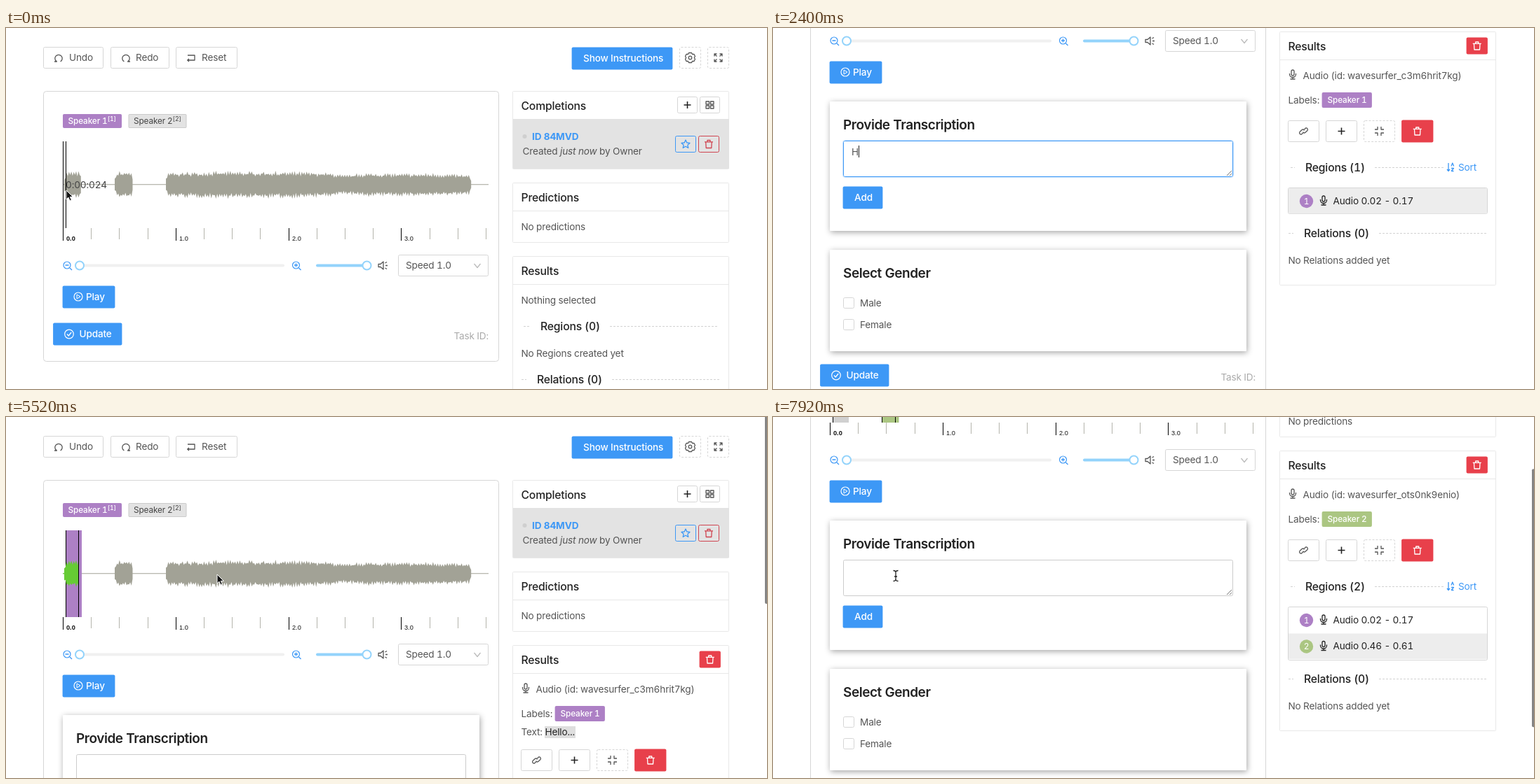
These frames come from a looping animation (1085 by 516 pixels, 8000 ms). An HTML page:

```html
<!DOCTYPE html>
<html lang="en">
<head>
<meta charset="utf-8">
<title>Audio labeling</title>
<style>
html, body { margin: 0; width: 100%; height: 100%; overflow: hidden; background: #fff; }
svg { display: block; width: 100%; height: 100%; }
text { font-family: Inter, "Open Sans", sans-serif; letter-spacing: -.011em; white-space: pre; font-variant-numeric: tabular-nums; }
.tick { font-family: "Liberation Sans", Arial, sans-serif; letter-spacing: 0; }
.card { filter: drop-shadow(1px 2px 4px rgba(0,0,0,.36)); }
</style>
</head>
<body>
<svg id="stage" viewBox="0 0 1085 516" preserveAspectRatio="none"></svg>
<script>
const LOOP = 8000, STEP = 120;
const BLUE = '#3d98f6', SKY = '#93d3fb', RED = '#e8404b', PURPLE = '#ad80c5', GREEN = '#abc682';
const DARK = '#222', BODY = '#555', EDGE = '#d6d6d6', PALE = '#e8e8e8';

// ---------- drawing helpers ----------
const box = (x, y, w, h, fill = '#fff', stroke, r = 2, more = '') => stroke
  ? `<rect x="${x + .5}" y="${y + .5}" width="${w - 1}" height="${h - 1}" rx="${r}" fill="${fill}" stroke="${stroke}" ${more}/>`
  : `<rect x="${x}" y="${y}" width="${w}" height="${h}" rx="${r}" fill="${fill}" ${more}/>`;
const solid = (x, y, w, h, fill) => box(x - .4, y - .4, w + .8, h + .8, fill);
const text = (x, cy, s, fill = BODY, size = 13.6, weight = 400, more = '') =>
  `<text x="${x}" y="${cy + size * .36}" fill="${fill}" font-size="${size}" font-weight="${weight}" ${more}>${s}</text>`;
const path = (x, y, d, stroke = BODY, w = 1.3, fill = 'none') =>
  `<path transform="translate(${x} ${y})" d="${d}" stroke="${stroke}" stroke-width="${w}" fill="${fill}" stroke-linejoin="round"/>`;
const circle = (x, y, r, fill, stroke = 'none', w = 1.2) =>
  `<circle cx="${x}" cy="${y}" r="${r}" fill="${fill}" stroke="${stroke}" stroke-width="${w}"/>`;
const vline = (x, y1, y2, c = '#000') => `<path d="M${x} ${y1}V${y2}" stroke="${c}"/>`;
const hline = (x1, x2, y, c = EDGE, dash = '') =>
  `<path d="M${x1} ${y + .5}H${x2}" stroke="${c}" stroke-dasharray="${dash}"/>`;
const dashes = (x1, x2, y) => hline(x1, x2, y, '#d2d2d2', '3 2');
const heading = (x, y, s) => text(x, y, s, DARK, 15.7, 500);

const CORNERS = [[-1, -1], [1, -1], [1, 1], [-1, 1]];
const icons = {
  undo: 'M-6 5H-2.6A5.2 5.2 0 1 1 2.6 5M-5 2.5L-2.6 5',
  redo: 'M6 5H2.6A5.2 5.2 0 1 0 -2.6 5M5 2.5L2.6 5',
  reset: 'M-5-4H5V3H-5M-3 1L-5.3 3L-3 5',
  gear: 'M-2-7H2L3-5L5.5-5L7-2L5.8 0L7 2L5.5 5H3L2 7H-2L-3 5H-5.5L-7 2L-5.8 0L-7-2L-5.5-5H-3Z',
  expand: CORNERS.map(([a, b]) => `M${a * 5.5} ${b * 2}V${b * 5.5}H${a * 2}M${a * 5.5} ${b * 5.5}L${a * 2} ${b * 2}`).join(''),
  shrink: CORNERS.map(([a, b]) => `M${a * 6.5} ${b * 2.5}H${a * 2.5}V${b * 6.5}`).join(''),
  grid: 'M-5.5-5H-1V-1H-5.5ZM1-5H5.5V-1H1ZM-5.5 1H-1V5H-5.5ZM1 1H5.5V5H1Z',
  plus: 'M-5 0H5M0-5V5',
  star: 'M0-6L1.8-2L6-1.6L2.8 1.2L3.8 5.4L0 3.2L-3.8 5.4L-2.8 1.2L-6-1.6L-1.8-2Z',
  trash: 'M-6-3.2H6M-2-3.2V-5.5H2V-3.2M-4.3-3.2L-3.8 5.5H3.8L4.3-3.2',
  link: 'M-1 2.5L-3 4.5A2.3 2.3 0 0 1 -5.5 1L-2-2.2A2.3 2.3 0 0 1 1-1M1-2.5L3-4.5A2.3 2.3 0 0 1 5.5-1L2 2.2A2.3 2.3 0 0 1 -1 1',
  mic: 'M-2-4A2 2 0 0 1 2-4V0A2 2 0 0 1 -2 0ZM-4.5-1V0A4.5 4.5 0 0 0 4.5 0V-1M0 4.5V7M-3.5 7H3.5',
  zoom: 'M4 4L7 7M-2.5 0H2.5',
  sound: 'M-6-2H-3L1-5.5V5.5L-3 2H-6ZM4 0H7M3.5-3.5L6-5M3.5 3.5L6 5',
  down: 'M-4.5-2.5L0 3L4.5-2.5',
  sort: 'M-3-6V5M-5 3L-3 5.5L-1 3M1 5.5H4.5M1 5.5L4.5 1.5H1M1-1.5L2.8-6L4.6-1.5',
  edit: 'M-6 6H6M-4 3L-3.4 .2L3-6L5-4L-1.4 2.4Z',
  tick: 'M-3 0L-.8 2.5L3.2-2.5',
  tri: 'M-2-3L3 0L-2 3Z'
};
const icon = (name, x, y, c, w = name === 'plus' ? 1.6 : 1.3) => path(x, y, icons[name], c, w);

function button(x, y, w, label, textX, c) {
  return (c ? solid(x, y, w, 31, c) : box(x, y, w, 31, '#fff', EDGE)) +
    text(textX, y + 15.5, label, c ? '#fff' : BODY, 13.6, c ? 500 : 400);
}
function iconButton(name, x, y, w, h, edge, c, more) {
  return box(x, y, w, h, 'none', edge, 2, more) + icon(name, x + w / 2, y + h / 2, c);
}
const redButton = (x, y, w, h) => solid(x, y, w, h, RED) + icon('trash', x + w / 2, y + h / 2, '#fff');
const DASHED = 'stroke-dasharray="3 2"';

// ---------- timing ----------
function track(keys, t) {
  const i = keys.findIndex(k => k[0] > t);
  if (i < 0) return keys[keys.length - 1].slice(1);
  if (!i) return keys[0].slice(1);
  const a = keys[i - 1], b = keys[i], p = (t - a[0]) / (b[0] - a[0]);
  return a.slice(1).map((v, j) => v + (b[j + 1] - v) * p);
}
const within = (t, a, b) => t >= a && t < b;

const SCROLL = [[840, 0], [1080, 188], [1440, 300], [1680, 321], [3600, 321], [3960, 460], [4200, 493],
  [5160, 493], [5520, 0], [5880, 0], [6000, -1], [6120, 0], [7320, 0], [7560, 160], [7800, 260], [7920, 278]];
const POINTER = [[0, 86, 232], [120, 86, 232], [600, 108, 236], [960, 103, 236], [1680, 103, 236], [2040, 175, 187],
  [3480, 175, 187], [3720, 172, 210], [4200, 126, 281], [5160, 126, 276], [5520, 301, 225], [5640, 301, 225],
  [6000, 142, 147], [6360, 216, 134], [6600, 216, 134], [6840, 155, 225], [7200, 179, 228], [7440, 179, 228], [7920, 175, 227]];

function stateAt(t) {
  const sel = within(t, 960, 5880) ? 1 : t >= 7320 ? 2 : 0;
  return {
    t, sel,
    count: t < 240 ? 0 : t < 6960 ? 1 : 2,
    hello: sel === 1 && t >= 3600,
    typed: within(t, 2400, 3600) ? 'Hello'.slice(0, 1 + Math.floor((t - 2400) / 180)) : '',
    focus: within(t, 2160, 3720),
    male: within(t, 4680, 5880),
    label: sel || (t < 720 ? 1 : t >= 6480 ? 2 : 0),
    scroll: track(SCROLL, t)[0],
    head: t < 960 ? 81.5 : t < 1800 ? 85.5 : t < 7320 ? 103.5 : 174.5
  };
}

// ---------- waveform ----------
const wave = (() => {
  let seed = 7;
  const rnd = () => (seed = seed * 16807 % 2147483647) / 2147483647;
  const burst = (x0, x1, amp) => {
    const up = [], low = [];
    for (let x = x0, i = 0; x <= x1; x += 1.7, i++) {
      const fade = Math.min(1, .5 + (x - x0) / 8, .2 + (x1 - x) / 4);
      const side = () => amp(x) * fade * (i % 2 ? .6 + rnd() * .2 : .78 + rnd() * .27);
      up.push(`${x.toFixed(1)} ${(223.7 - side()).toFixed(1)}`);
      low.unshift(`${x.toFixed(1)} ${(223.7 + side() * 1.04).toFixed(1)}`);
    }
    return `M${up.concat(low).join('L')}Z`;
  };
  const long = x => 17.5 + 1.5 * Math.sin((x - 228) / 75) - 3.5 * Math.exp(-(((x - 483) / 16) ** 2)) - Math.max(0, x - 610) / 18;
  return burst(83, 108.5, () => 18.5) + burst(155, 182, () => 18.5) + burst(228, 664, long) + 'M81 223.2H688V224.2H81Z';
})();

const region = (x0, x1, c) => box(x0, 162, x1 - x0, 124, c, '', 0) + vline(x0 + .5, 162, 286);

function waveform(s) {
  let out = `<path d="${wave}" fill="#a2a296"/>`;
  if (s.t >= 120) out += region(85, track([[0, 85], [120, 88], [600, 108]], s.t)[0], s.t < 5880 ? PURPLE : '#d0d0d0');
  if (s.count > 1) out += region(155, track([[6840, 155], [7200, 179.5]], s.t)[0], GREEN);
  if (s.head > 90) out += `<clipPath id="played"><rect x="81" y="160" width="${s.head - 81}" height="130"/></clipPath>` +
    `<path d="${wave}" fill="#66cb34" clip-path="url(#played)"/>`;
  out += vline(s.head, 162, 286);
  if (s.t < 120) out += vline(85.5, 162, 286) + text(85, 224, '0:00:024', '#444');
  for (let i = 0; i < 16; i++) {
    const x = Math.round(81 + i * 40.2) + .5, big = i % 4 === 0;
    out += vline(x, 286, big ? 304 : 302, big ? '#000' : '#b4b4ac');
    if (big) out += text(x + 4.5, 300.5, i / 4 + '.0', '#111', 9.2, i ? 400 : 700, 'class="tick"');
  }
  return out;
}

// ---------- left column ----------
function toolbar() {
  return button(53, 27, 86, 'Undo', 90) + icon('undo', 75, 43) +
    button(149, 27, 84, 'Redo', 185) + icon('redo', 171, 43) +
    button(242, 27, 88, 'Reset', 279) + icon('reset', 264, 43) +
    button(807, 28, 143, 'Show Instructions', 823, BLUE) +
    iconButton('gear', 960, 27, 31, 31, EDGE, BODY, DASHED) + circle(975.5, 42.5, 2.3, 'none', BODY) +
    iconButton('expand', 1000, 27, 31, 31, EDGE, BODY, DASHED);
}

function tag(x, w, n, on) {
  const c = on ? '#fff' : '#444';
  return box(x, 123, w, 20, on || '#e3e3e3', on || '#cbcbcb', 1) +
    text(x + 7.5, 133, `Speaker ${n}<tspan dy="-4" font-size="8.8">[${n}]</tspan>`, c, 11.8, on ? 500 : 400);
}

function controls() {
  const knob = x => circle(x, 339.5, 6, '#fff', SKY, 2);
  return circle(87, 339, 5, 'none', BLUE) + icon('zoom', 87, 339, BLUE) +
    box(105, 337.5, 292, 4, '#f0f0f0') + knob(105) +
    circle(413.5, 339, 5, 'none', BLUE) + icon('zoom', 413.5, 339, BLUE) + path(413.5, 339, 'M0-2.5V2.5', BLUE) +
    box(442, 337.5, 73, 4, SKY) + knob(514.5) + icon('sound', 537, 339.5) +
    box(559, 324, 129, 31, '#fff', EDGE) + text(570, 339.5, 'Speed 1.0') + icon('down', 672, 339.5, '#bbb') +
    button(81, 369, 74, 'Play', 114, BLUE) + circle(103, 384, 6, 'none', '#fff') + icon('tri', 103, 384, '#fff', 1);
}

function check(y, label, on, hover) {
  return box(100, y - 8, 16, 16, on ? BLUE : '#fff', on || hover ? BLUE : EDGE) +
    (on ? icon('tick', 108, y, '#fff', 2) : '') + text(124, y, label);
}

function cards(s, dy) {
  const title = (y, label) => text(100, y, label, DARK, 19, 600, 'style="letter-spacing:-.024em"');
  let out = box(81, 426, 594, 185 + dy, '#fff', '', 1, 'class="card"') + title(459, 'Provide Transcription') +
    box(100, 482, 556, 52, '#fff', s.focus ? BLUE : '#ccc', 2) + path(651, 529, 'M-4 3L3-4M0 3L3 0', '#777', 1);
  if (s.focus) {
    out += box(99, 481, 558, 54, 'none', '#cfe6fd', 3) + text(112, 498, s.typed) +
      vline(112.5 + [0, 10, 18, 21, 24, 33][s.typed.length], 489, 506, '#222');
  }
  out += button(100, 548, 56, 'Add', 116, BLUE);
  if (s.hello) out += box(100, 602, 83, 34, '#f2f2ef', '#c8c8c4', 4) + text(115, 619, 'Hello') +
    icon('edit', 161, 618.5, BLUE) + icon('trash', 202.5, 619.5, BLUE);
  return out + box(81, 638 + dy, 594, 145, '#fff', '', 1, 'class="card"') + title(671 + dy, 'Select Gender') +
    check(714 + dy, 'Male', s.male, within(s.t, 4200, 5280)) + check(745 + dy, 'Female');
}

function leftColumn(s) {
  const dy = s.hello ? 54 : 0, y = s.sel ? 802 + dy : 422;
  return box(53, 90, 650, y - 35, '#fff', EDGE, 4) +
    tag(81, 84, 1, s.label === 1 && PURPLE) + tag(174.5, 83, 2, s.label === 2 && GREEN) +
    waveform(s) + controls() + (s.sel ? cards(s, dy) : '') +
    button(67.5, y, 97.5, 'Update', 104.5, BLUE) + circle(90, y + 15.5, 6.3, 'none', '#fff') + icon('tick', 90, y + 15.5, '#fff') +
    text(688, y + 18, 'Task ID:', '#aaa', 13.6, 400, 'text-anchor="end"') +
    (s.sel ? text(542, y + 92, `Made by <tspan fill="${BLUE}">Brintav</tspan> in San Francisco`, BODY, 13.6, 400, 'text-anchor="middle"') +
      `<ellipse cx="542" cy="${y + 168}" rx="72" ry="39" fill="#8f8f88"/>` : '');
}

// ---------- right column ----------
const panel = (y, h, title) =>
  box(722, y, 309, h, '#fff', PALE, 1) + hline(723, 1030, y + 40, PALE) + heading(734.5, y + 21, title);

function results(s) {
  let y = 389, out = '';
  if (s.sel) {
    const id = s.sel === 1 ? 'c3m6hrit7kg' : 'ots0nk9enio';
    out += icon('mic', 741, 387) + text(755.5, 389, `Audio (id: wavesurfer_${id})`) + text(734.5, 424, 'Labels:') +
      solid(783, 413.5, 70.5, 21, s.sel === 1 ? PURPLE : GREEN) + text(790.5, 424, 'Speaker ' + s.sel, '#fff', 11.8, 500);
    if (s.hello) out += text(734.5, 450, 'Text:') + box(768, 442, 44, 17, '#dedede', '', 0) + text(768.5, 450, 'Hello...', DARK);
    const by = s.hello ? 475 : 453;
    out += iconButton('link', 734, by, 45, 31, EDGE, BODY) + iconButton('plus', 788, by, 45, 31, EDGE, DARK) +
      iconButton('shrink', 842, by, 45, 31, EDGE, BODY, DASHED) + redButton(896.5, by, 44.5, 31);
    y = by + 67;
  } else {
    out += text(734.5, 389, 'Nothing selected');
    y = 426;
  }
  const n = s.count;
  if (n) {
    out += redButton(989, 335, 29.5, 23) +
      dashes(738, 744, y) + heading(759, y, `Regions (${n})`) + dashes(858, 958, y) +
      icon('sort', 966, y, BLUE) + text(977, y + .5, 'Sort', BLUE) +
      box(734, y + 29, 285, 38 * n + (n > 1 ? 1 : 0), '#fff', EDGE, 2);
    for (let i = 1; i <= n; i++) {
      const cy = y + 48 + (i - 1) * 37.5;
      if (s.sel === i) out += box(735, cy - 18, 283, 36.5, '#ededed', '', 0);
      out += circle(760.5, cy + .5, 9.7, i === 1 ? PURPLE : GREEN) + text(760.5, cy + .5, i, '#fff', 12, 400, 'text-anchor="middle"') +
        icon('mic', 785, cy - 1, DARK) + text(798.5, cy, i === 1 ? 'Audio 0.02 - 0.17' : 'Audio 0.46 - 0.61', DARK);
    }
    y += 56 + 38 * n;
  } else {
    out += dashes(738, 746, y) + heading(762, y, 'Regions (0)') + dashes(861, 1014, y) + text(734.5, 465, 'No Regions created yet');
    y = 502;
  }
  out += dashes(735, 742, y) + heading(757, y, 'Relations (0)') + dashes(864, 1018, y) + text(734.5, y + 39, 'No Relations added yet');
  return panel(326, y + 75 - 326, 'Results') + out;
}

function rightColumn(s) {
  return panel(90, 112, 'Completions') + box(723, 130, 308, 71, '#e3e3e3', '', 0) +
    iconButton('plus', 957, 98, 29, 24, EDGE, DARK) + iconButton('grid', 989, 98, 29, 24, EDGE, BODY) +
    circle(739.5, 155, 3, '#cfcfcf') + text(750, 155.5, 'ID 84MVD', BLUE, 13.6, 700) +
    text(736.5, 176.5, 'Created <tspan font-style="italic">just now</tspan> by Owner') +
    iconButton('star', 954, 154, 30, 24, BLUE, BLUE) + iconButton('trash', 987, 154, 30, 24, '#cf4450', '#cf4450') +
    panel(221, 86, 'Predictions') + text(734.5, 284, 'No predictions') + results(s);
}

// ---------- overlays ----------
function scrollbar(s) {
  const { t } = s;
  if (!(within(t, 1200, 1920) || within(t, 3720, 4920) || within(t, 5280, 6240) || t >= 7440)) return '';
  const ratio = 640 / (s.sel ? (s.hello ? 1160 : 1110) : 834);
  return box(1082, s.scroll * ratio - 86, 4, 640 * ratio, within(t, 5880, 6240) || within(t, 4320, 4920) ? '#c0c0c0' : '#858585', '', 2);
}

function pointer(t) {
  if (within(t, 2280, 3480)) return '';
  const [x, y] = track(POINTER, t);
  if (within(t, 1920, 2280) || t >= 7680)
    return path(x, y, 'M-3.5-7.5Q0-7.5 0-5V5Q0 7.5-3.5 7.5M3.5-7.5Q0-7.5 0-5V5Q0 7.5 3.5 7.5M-2 1H2', '#222');
  if (within(t, 4200, 5280))
    return path(x, y, 'M-3-7Q-1.5-8 -.8-6V-1L0-2.5Q1.5-3 2-1.5Q3.5-2.5 4.2-.8Q6-1.2 6 1V4Q5 6 4.5 9H-2.5Q-3 7-4 5L-6.5 1.5Q-6-.5 -3 1.5Z', '#111', 1.1, '#fff') +
      path(x, y, 'M-.3 3V6M1.7 3V6M3.7 3V6', '#111', .8);
  return path(x, y, 'M0 0V13L3 10.2L5 15L7.4 14L5.4 9.4H9.4Z', '#fff', 1, '#111');
}

const stage = document.getElementById('stage');
let shown = -1;
function frame(now) {
  const t = Math.floor(now % LOOP / STEP) * STEP;
  if (t !== shown) {
    shown = t;
    const s = stateAt(t);
    stage.innerHTML = `<g transform="translate(0 ${-Math.round(s.scroll)})">${toolbar()}${leftColumn(s)}${rightColumn(s)}</g>` +
      scrollbar(s) + pointer(t);
  }
  requestAnimationFrame(frame);
}
frame(performance.now());
</script>
</body>
</html>
```
